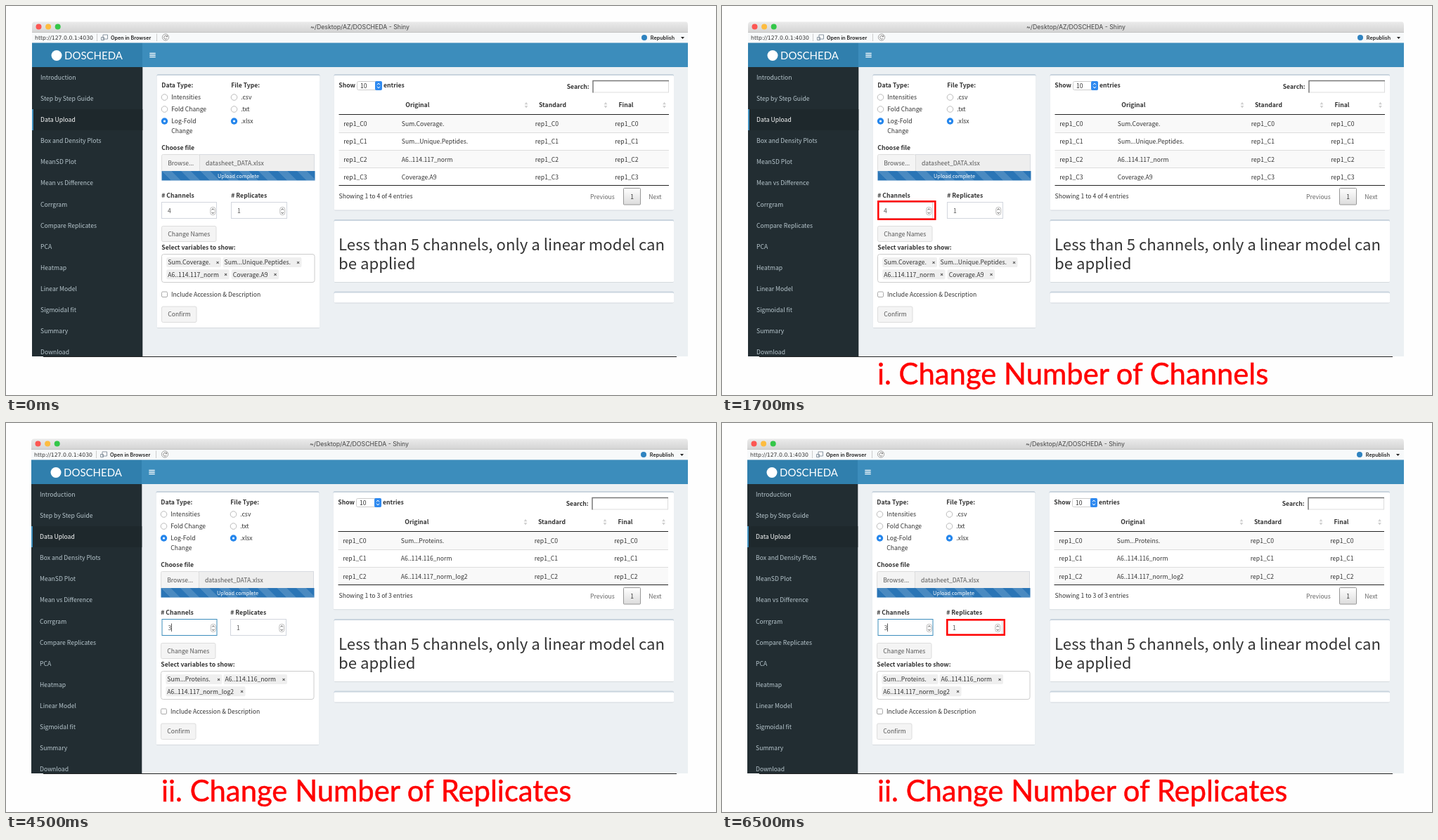
Animation of 1010x554 px, one loop 8 s. Source, as an HTML page:

```html
<!DOCTYPE html>
<html lang="en">
<head>
<meta charset="utf-8">
<title>Channels and replicates</title>
<style>
html, body { margin: 0; width: 100%; height: 100%; overflow: hidden; background: #fefefe; }
svg { display: block; width: 1010px; height: 554px; }
text { font: 8.63px "Noto Sans CJK JP", "Noto Sans CJK SC", "Noto Sans CJK", "Noto Sans", sans-serif; fill: #333; white-space: pre; }
.bold { font-weight: 700; }
.nav { fill: #b8c7ce; }
.on { fill: #fff; }
.soft { fill: #555; }
.pale { fill: #666; }
.small { font-size: 7.4px; fill: #fff; }
.head { font-size: 22.2px; }
.cross { font-family: Lato, sans-serif; font-size: 8px; font-weight: 700; text-anchor: middle; }
.title { font-family: Inter, "Open Sans", sans-serif; font-size: 8.72px; fill: #444; }
.url { font-family: "DejaVu Sans", sans-serif; font-size: 7.75px; }
.tool { font-family: Inter, "Open Sans", sans-serif; font-size: 7.2px; font-weight: 600; fill: #222; }
.name { font-family: Lato, sans-serif; font-size: 15px; fill: #fff; }
.caption { font-family: Lato, sans-serif; font-size: 41.8px; fill: #f00; stroke: #f00; stroke-width: .5; }
.mark { fill: none; stroke: #f00; stroke-width: 2.5; }
</style>
</head>
<body>
<svg id="stage" viewBox="0 0 1010 554">
  <defs>
    <clipPath id="frame"><path d="M0 22H966Q970 22 970 27V499H0Z"/></clipPath>
    <linearGradient id="bar" x2="0" y2="1"><stop stop-color="#ebebeb"/><stop offset="1" stop-color="#d3d3d3"/></linearGradient>
    <linearGradient id="key" x2="0" y2="1"><stop stop-color="#fff"/><stop offset="1" stop-color="#dcdcdc"/></linearGradient>
    <pattern id="stripes" x="221.5" y="0" width="27.5" height="14" patternUnits="userSpaceOnUse" patternTransform="translate(-235 235) skewX(45) translate(235 0)">
      <rect width="13.75" height="14" fill="#fff" fill-opacity=".15"/>
    </pattern>
  </defs>
  <g clip-path="url(#frame)"><g id="app"></g></g>
  <path d="M53 499.5H954" stroke="#222"/>
  <g id="notes"></g>
</svg>
<script>
const $ = id => document.getElementById(id);

// Text is placed by its left edge and the middle of its capitals.
const text = (x, y, s, cls = '') => `<text x="${x}" y="${y + 3.2}" class="${cls}">${s}</text>`;
const box = (x, y, x2, y2, fill, line = 'none', r = 0) =>
  `<rect x="${x}" y="${y}" width="${x2 - x}" height="${y2 - y}" rx="${r}" fill="${fill}" stroke="${line}"/>`;
const path = (d, stroke, fill = 'none', w = 1) =>
  `<path d="${d}" stroke="${stroke}" fill="${fill}" stroke-width="${w}"/>`;
const dot = (x, y, r, fill, line = 'none') =>
  `<circle cx="${x}" cy="${y}" r="${r}" fill="${fill}" stroke="${line}" stroke-width=".8"/>`;
const group = (id, s) => `<g id="${id}">${s}</g>`;

const panel = (x, y, x2, y2) =>
  box(x, y + 1, x2, y2 + 1, '#d5dade', 'none', 2) +
  box(x, y, x2, y2, '#c9d4de', 'none', 2) + box(x, y + 2, x2, y2, '#fff', 'none', 1.5);
const button = (x, y, x2, y2, s) =>
  box(x, y, x2, y2, '#f4f4f4', '#ddd', 2) + text(x + 8.7, (y + y2) / 2, s, 'soft');
const radio = (x, y, s, on) =>
  (on ? dot(x, y, 4.7, '#2586ec') + dot(x, y, 1.6, '#fff') : dot(x, y, 4.3, '#fff', '#aaa')) +
  text(x + 9.7, y, s);
const spinner = x => box(x - 3.5, 286.5, x + 3.5, 297.5, '#fff', '#bbb', 3) +
  path(`M${x - 1.7} 290.6l1.7-2 1.7 2M${x - 1.7} 293.6l1.7 2 1.7-2`, '#444', 'none', .9);
const number = (x, w, s, line) =>
  box(x, 279.5, x + w, 302.5, '#fff', line) + text(x + 8.5, 291.3, s, 'soft') + spinner(x + 72.8);
const tag = (x, x2, y, s) =>
  box(x - 2, y - 7, x2 - 1, y + 7, '#efefef', 'none', 2) + text(x, y, s) + text(x2 - 6, y - .4, '×', 'cross');
const sorter = x => path(`M${x - 2.4} 140.2l2.4-3.4 2.4 3.4zM${x - 2.4} 142l2.4 3.4 2.4-3.4z`, 'none', '#d0d0d0');

function chrome() {
  const pages = ['Introduction', 'Step by Step Guide', 'Data Upload', 'Box and Density Plots', 'MeanSD Plot',
    'Mean vs Difference', 'Corrgram', 'Compare Replicates', 'PCA', 'Heatmap', 'Linear Model', 'Sigmoidal fit',
    'Summary', 'Download'];
  return path('M37 38V27Q37 22.5 41 22.5H972V38z', 'none', 'url(#bar)') +
    ['#fc5753', '#fdbc40', '#34c749'].map((c, i) => dot(46.5 + 13.6 * i, 29.5, 4, c)).join('') +
    text(433, 29.7, '~/Desktop/AZ/DOSCHEDA - Shiny', 'title') +
    box(37, 37, 972, 53, '#f7f9fa') + path('M37 37.5H972', '#c4c4c4') +
    text(41, 44.3, 'http://127.0.0.1:4030', 'url') +
    path('M129.5 39.5V50M214.5 39.5V50', '#ccc') +
    path('M138 41h6.5v6h-6.5zM135.5 48.5v-4h4v4z', '#7b8a96', '#fff', .9) +
    text(149, 44.3, 'Open in Browser', 'tool') +
    dot(227, 44.5, 4.6, '#fff', '#888') + path('M229.2 43.4A2.4 2.4 0 1 0 229.2 46M229.6 41.8v2h-2', '#777', 'none', .9) +
    dot(908, 45, 4, '#2f83c0') + text(916.8, 44.7, 'Republish', 'tool') +
    path('M960 44h5l-2.5 3z', 'none', '#222') +
    box(37, 52.5, 972, 500, '#ecf0f3') + box(194, 52.5, 972, 87, '#3c8dbc') +
    box(37, 52.5, 194, 87, '#307fad') + box(37, 87, 194.3, 500, '#222d32') +
    dot(72, 70.5, 7.5, '#fff') + text(83, 72.5, 'DOSCHEDA', 'name') +
    path('M204.3 67.4h8.4M204.3 70h8.4M204.3 72.6h8.4', '#fff', 'none', 1.4) +
    box(37, 147, 194.3, 177, '#1e282c') + box(37, 147, 39, 177, '#3c8dbc') +
    pages.map((s, i) => text(49, 102 + 30.05 * i, s, i == 2 ? 'nav on' : 'nav')).join('');
}

function form() {
  return panel(214.5, 97, 446.5, 458) +
    text(221.3, 113, 'Data Type:', 'bold') + text(320.3, 113, 'File Type:', 'bold') +
    radio(225.5, 130, 'Intensities') + radio(225.5, 147, 'Fold Change') +
    radio(225.5, 164, 'Log-Fold', true) + text(235.2, 178, 'Change') +
    radio(324.5, 130, '.csv') + radio(324.5, 147, '.txt') + radio(324.5, 164, '.xlsx', true) +
    text(221.3, 202, 'Choose file', 'bold') +
    box(275.5, 211.5, 438.5, 235.5, '#eee', '#d8dbe0') + button(221.5, 211.5, 275.5, 235.5, 'Browse...') +
    text(284, 223.5, 'datasheet_DATA.xlsx', 'soft') +
    box(221.5, 235, 439.5, 248.5, '#2a75b6') + box(221.5, 235, 439.5, 248.5, 'url(#stripes)') +
    text(301, 241.4, 'Upload complete', 'small') +
    text(221.3, 269.5, '# Channels', 'bold') + text(320.3, 269.5, '# Replicates', 'bold') +
    number(320.5, 79, '1', '#d2d6de') +
    button(221.5, 313.5, 299, 335.5, 'Change Names') +
    text(221.3, 343.3, 'Select variables to show:', 'bold') +
    box(221.5, 353.5, 439, 393.5, '#fff', '#ccc', 3) +
    box(221.5, 407, 229.5, 414.5, '#fff', '#aaa', 1.5) + text(235, 411, 'Include Accession &amp; Description') +
    button(221.5, 428, 271, 450.5, 'Confirm');
}

function table(names, dx) {
  const pitch = 25.2, bottom = 155 + pitch * names.length, end = pitch * (names.length - 4);
  const row = (s, i) => {
    const y = 155 + pitch * i, rep = 'rep1_C' + i;
    return (i % 2 ? '' : box(473.5, y, 943, y + pitch, '#f9f9f9')) +
      (i ? path(`M473.5 ${Math.floor(y) + .5}H943`, '#ddd') : '') +
      text(480.3, y + 12.9, rep) + text(562.8, y + 12.9, s) + text(752.8, y + 12.9, rep) + text(866.3, y + 12.9, rep);
  };
  const lower = panel(466.5, 304, 950, 393) + panel(466.5, 406.5, 950, 422.5) +
    text(473.5, 271, `Showing 1 to ${names.length} of ${names.length} entries`) +
    text(831, 271.3, 'Previous', 'pale') + box(878.5, 259.5, 902.5, 283, 'url(#key)', '#979797', 1) +
    text(888.2, 271.3, '1') + text(914.3, 271.3, 'Next', 'pale') +
    text(473.1, 344.8, 'Less than 5 channels, only a linear model can', 'head') +
    text(473.1, 371.6, 'be applied', 'head');
  return panel(466.5, 97, 950 + dx, 290.5 + end) +
    text(473.3, 113, 'Show', 'bold') + box(499.5, 107.5, 534.5, 119.5, '#fff', '#ccc', 2) +
    text(504, 113.5, '10') + box(525, 107, 535, 120, '#2f8af0', 'none', 2) +
    path('M528 112.3l2-2.3 2 2.3M528 114.7l2 2.3 2-2.3', '#fff') +
    text(537, 113, 'entries', 'bold') + text(797.7, 115, 'Search:', 'bold') +
    box(835, 106.5, 942.5, 123, '#fff', '#ddd') + path('M835 123.5V106.5H943', '#777', 'none', 1.4) +
    text(568.3, 141, 'Original', 'bold') + text(758, 141, 'Standard', 'bold') + text(871.5, 141, 'Final', 'bold') +
    [740, 853, 936.5].map(sorter).join('') + names.map(row).join('') +
    path(`M473.5 154.5H943M473.5 ${Math.floor(bottom) + .5}H943`, '#222') +
    `<g transform="translate(${dx} ${Math.round(end)})">${lower}</g>`;
}

const four = table(['Sum.Coverage.', 'Sum...Unique.Peptides.', 'A6..114.117_norm', 'Coverage.A9'], 0) +
  number(221.5, 78, '4', '#d2d6de') +
  tag(230.3, 307, 365, 'Sum.Coverage.') + tag(310.5, 421.5, 365, 'Sum...Unique.Peptides.') +
  tag(230.3, 318.5, 382.3, 'A6..114.117_norm') + tag(322.7, 389, 382.3, 'Coverage.A9');
const three = table(['Sum...Proteins.', 'A6..114.116_norm', 'A6..114.117_norm_log2'], 1) +
  number(223, 78, '3', '#3c8dbc') + path('M236.5 285.5V297', '#333', 'none', .8) +
  tag(230.3, 309.5, 365, 'Sum...Proteins.') + tag(312.5, 402, 365, 'A6..114.116_norm') +
  tag(230.3, 342.5, 382.3, 'A6..114.117_norm_log2');

$('app').innerHTML = chrome() + form() + group('four', four) + group('three', three);
$('notes').innerHTML =
  group('step1', text(221, 535.8, 'i. Change Number of Channels', 'caption')) +
  group('step2', text(221, 535.8, 'ii. Change Number of Replicates', 'caption')) +
  group('mark1', '<rect class="mark" x="222.3" y="278.3" width="81" height="25.4"/>') +
  group('mark2', '<rect class="mark" x="320.3" y="280.3" width="81.4" height="21.4"/>');

// Visible span of each part within the loop, in ms.
const spans = {
  four: [0, 2500], three: [2500, 8000],
  step1: [500, 4500], step2: [4500, 8000],
  mark1: [500, 2500], mark2: [6500, 8000]
};

function draw() {
  const t = performance.now() % 8000;
  for (const [id, [from, to]] of Object.entries(spans))
    $(id).style.display = t >= from && t < to ? '' : 'none';
  $('app').setAttribute('transform', `translate(${t < 4500 ? 0 : -1} 0)`);
  requestAnimationFrame(draw);
}
draw();
</script>
</body>
</html>
```
